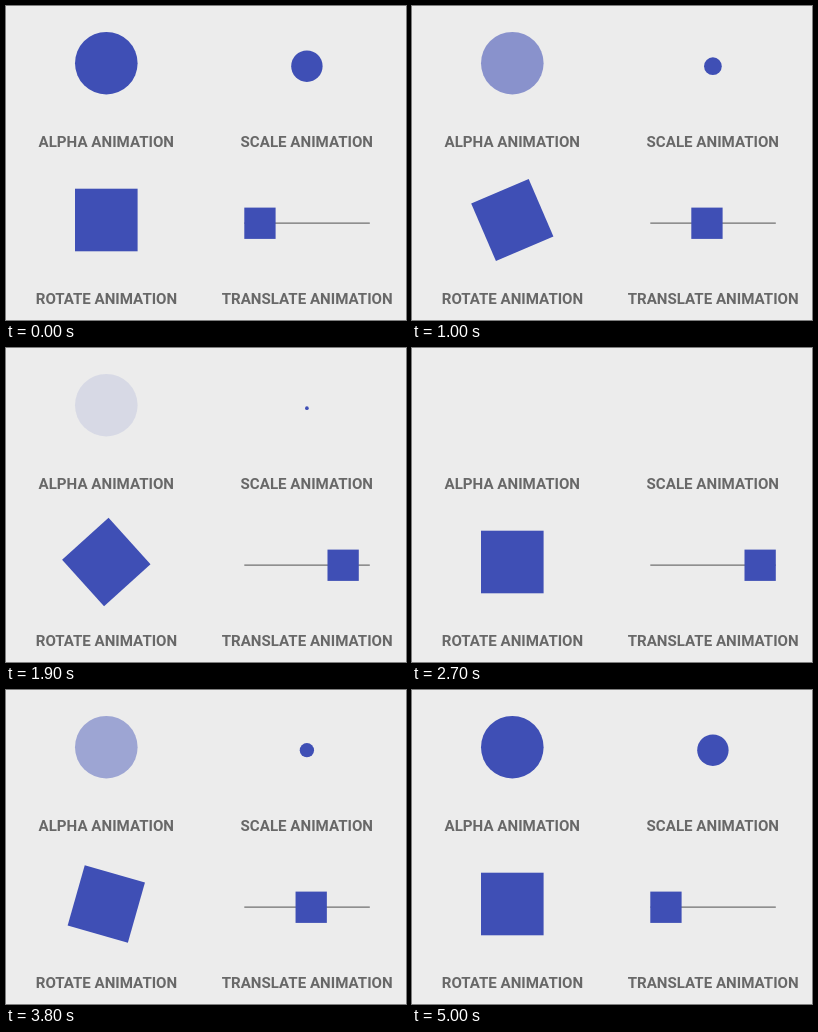
Recreate the animation shown at these times as an HTML page. Size 400 px wide and 314 px high, loop 5100 ms.

```html
<!DOCTYPE html>
<html lang="en">
<head>
<meta charset="utf-8">
<title>Basic animations</title>
<style>
  html, body { margin: 0; width: 100%; height: 100%; overflow: hidden; background: #ececec; }
  svg { display: block; width: 400px; height: 314px; }
  text { font: 700 15.1px Roboto, sans-serif; fill: #686868; text-anchor: middle; }
  .shape { fill: #3f4fb5; }
</style>
</head>
<body>
<svg viewBox="0 0 400 314">
  <circle id="alpha" class="shape" cx="100.3" cy="57.2" r="31.3"/>
  <circle id="scale" class="shape" cx="300.9" cy="60.2" r="15.7"/>
  <rect id="rotate" class="shape" x="69" y="182.7" width="62.6" height="62.6"/>
  <path d="M238.3 217.1H363.8" stroke="#707070" stroke-width="1.3"/>
  <rect id="translate" class="shape" x="238.3" y="201.6" width="31.3" height="31.3"/>
  <text x="100.3" y="140.8">ALPHA ANIMATION</text>
  <text x="300.8" y="140.8">SCALE ANIMATION</text>
  <text x="100.5" y="297.8">ROTATE ANIMATION</text>
  <text x="301.2" y="297.8">TRANSLATE ANIMATION</text>
</svg>
<script>
  const LOOP = 5100, TICK = 100;
  const OUT = { start: 125, length: 2010 };
  const BACK = { start: 2879, length: 2020 };
  const TRAVEL = 94.2;

  const [alpha, scale, rotate, translate] =
    ['alpha', 'scale', 'rotate', 'translate'].map(id => document.getElementById(id));

  const ramp = (t, { start, length }) => Math.min(1, Math.max(0, (t - start) / length));

  function draw(t) {
    const p = ramp(t, OUT) - ramp(t, BACK);
    alpha.setAttribute('opacity', 1 - p);
    scale.setAttribute('r', 15.7 * (1 - p));
    rotate.setAttribute('transform', `rotate(${360 * p} 100.3 214)`);
    translate.setAttribute('transform', `translate(${TRAVEL * p})`);
  }

  const origin = performance.now();
  function frame() {
    const t = (performance.now() - origin) % LOOP;
    draw(Math.floor(t / TICK) * TICK);
    requestAnimationFrame(frame);
  }
  draw(0);
  requestAnimationFrame(frame);
</script>
</body>
</html>
```
